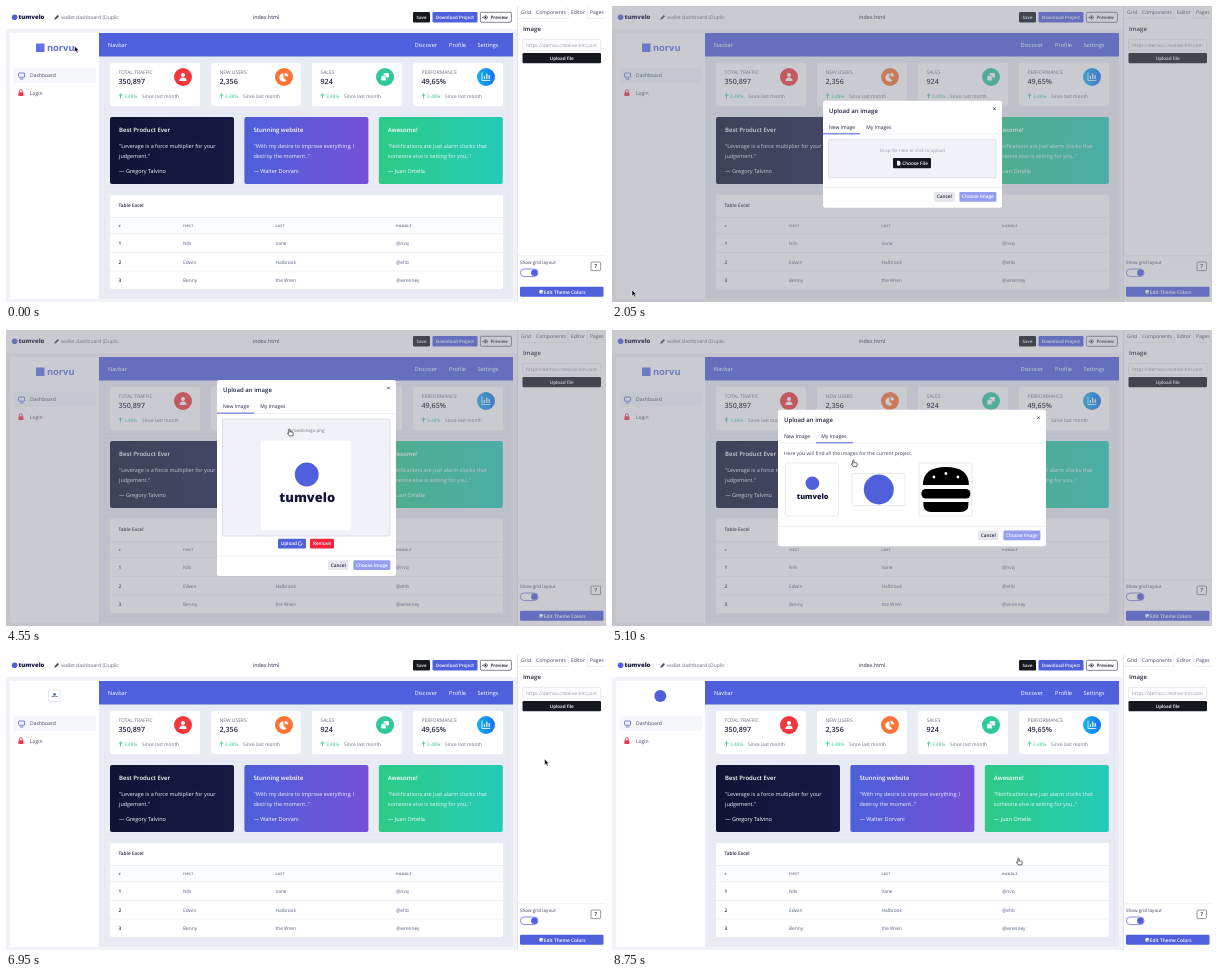
Animation of 600 by 296 pixels, one loop 8800 ms. Source, as an HTML page:

```html
<!DOCTYPE html>
<html lang="en">
<head>
<meta charset="utf-8">
<title>Image upload walkthrough</title>
<style>
html, body { margin: 0; height: 100%; overflow: hidden; background: #fff; }
svg { display: block; width: 100vw; height: 100vh; }
text { font-family: "Open Sans", "Noto Sans", sans-serif; text-rendering: geometricPrecision; }
</style>
</head>
<body>
<svg viewBox="0 0 600 296">
  <defs>
    <linearGradient id="navy"><stop stop-color="#0f1433"/><stop offset="1" stop-color="#171a45"/></linearGradient>
    <linearGradient id="violet"><stop stop-color="#4d60d9"/><stop offset="1" stop-color="#7550d6"/></linearGradient>
    <linearGradient id="mint"><stop stop-color="#2dcb85"/><stop offset="1" stop-color="#25cbb8"/></linearGradient>
    <linearGradient id="sky"><stop stop-color="#12b4ee"/><stop offset="1" stop-color="#1671ef"/></linearGradient>
  </defs>
  <g id="page"></g>
  <g id="brand"></g>
  <g id="layer">
    <rect width="600" height="296" fill="#80848f" opacity=".42"/>
    <g id="modal"></g>
  </g>
  <g id="drag"></g>
  <g id="cursor"></g>
</svg>
<script>
const $ = id => document.getElementById(id);
const BLUE = '#5060dd', PALE = '#959df0', INK = '#1f2440', BODY = '#525f7f', LINE = '#e4e7ee', BLACK = '#15181f';
const PRODUCT = 'tumvelo', THEME = 'norvu';

const rect = (x, y, w, h, fill, r = 0, extra = '') =>
  `<rect x="${x}" y="${y}" width="${w}" height="${h}" fill="${fill}" rx="${r}" ${extra}/>`;
const box = (x, y, w, h, fill, r, stroke, sw = .6) =>
  rect(x, y, w, h, fill, r, `stroke="${stroke}" stroke-width="${sw}"`);
const disc = (x, y, r, fill) => `<circle cx="${x}" cy="${y}" r="${r}" fill="${fill}"/>`;
const path = (d, fill, extra = '') => `<path d="${d}" fill="${fill}" ${extra}/>`;
const stroke = (d, color, w = .8, extra = '') =>
  path(d, 'none', `stroke="${color}" stroke-width="${w}" stroke-linecap="round" stroke-linejoin="round" ${extra}`);
const hline = (x, y, w, color = LINE) => rect(x, y, w, .6, color);
// y is the middle of the capitals
const text = (x, y, s, size = 5, fill = INK, weight = 400, extra = '') =>
  `<text x="${x}" y="${y + size * .357}" font-size="${size}" fill="${fill}" font-weight="${weight}" ${extra}>${s}</text>`;
const mid = (x, y, s, size, fill, weight) => text(x, y, s, size, fill, weight, 'text-anchor="middle"');
const button = (x, y, w, h, fill, label, size = 4.6, color = '#fff', dx = 0) =>
  rect(x, y, w, h, fill, 1.3) + mid(x + w / 2 + dx, y + h / 2, label, size, color, 600);

// Square picture with the product logo, drawn on a 90 px base
const logoCard = (x, y, size) => `<g transform="translate(${x} ${y}) scale(${size / 90})">` +
  rect(0, 0, 90, 90, '#fff') + disc(46, 34, 12, BLUE) + mid(46.5, 57, PRODUCT, 13, '#14163a', 800) + '</g>';

function topBar() {
  return rect(0, 0, 600, 296, '#f2f3f8') + rect(0, 0, 600, 23, '#fff') +
    disc(8.6, 11.3, 2.8, BLUE) + text(12.5, 11, PRODUCT, 6, '#14163a', 800) +
    path('M48.3 13.7l.5-1.8 2.9-2.9 1.3 1.3-2.9 2.9z', '#3f4658') +
    text(55, 11.3, 'wallet dashboard (Duplic', 5, '#626978') +
    text(247, 11.3, 'index.html', 5.3, INK, 500) +
    button(407, 6, 17, 10.5, BLACK, 'Save', 4.4) +
    button(426.5, 6, 45, 10.5, BLUE, 'Download Project', 4.5) +
    box(474.4, 6.3, 31, 10, '#fff', 1.3, '#30343f') +
    stroke('M477 11.4q2.5-3.4 5 0q-2.5 3.4-5 0z', BLACK, .6) + disc(479.5, 11.4, .9, BLACK) +
    text(484.5, 11.3, 'Preview', 4.6, BLACK, 600);
}

function sidebar() {
  return rect(4, 27, 89, 266, '#fff') +
    rect(7.5, 62, 82.5, 15, '#f5f7fb', 1.5) +
    box(12.6, 67, 6, 4.2, 'none', .5, BLUE, .8) + stroke('M14.2 73h2.8', BLUE) + text(24, 69.6, 'Dashboard', 5, '#3c4560') +
    rect(12.4, 86.2, 5, 3.8, '#f0344a', .6) + stroke('M13.5 86v-1a1.4 1.4 0 0 1 2.8 0v1', '#f0344a') +
    text(24, 87, 'Login', 5, '#3c4560');
}

function statCard(i, title, value, fill, icon) {
  const x = 104 + 101 * i;
  return rect(x, 57, 90, 43, '#fff', 2) + text(x + 8.5, 66, title, 4.95, '#656d80') +
    text(x + 8.5, 75.2, value, 7.2, INK, 600) +
    stroke(`M${x + 10.5} 92v-4m-1.8 1.8l1.8-1.8 1.8 1.8`, '#2dc77f') +
    text(x + 14, 90, '3.48%', 4.75, '#2dc77f') + text(x + 32, 90, 'Since last month', 4.8, '#656d80') +
    disc(x + 73, 71, 9, fill) + `<g transform="translate(${x + 73} 71)">${icon}</g>`;
}

function quote(i, fill, title, lines, author) {
  const x = 104 + 134.4 * i;
  return rect(x, 111, 124, 67, fill, 2) + text(x + 9, 124.2, title, 6, '#fff', 600) +
    lines.map((s, n) => text(x + 9, 140.3 + 9.7 * n, s, 5.45, '#f0f2ff')).join('') +
    text(x + 9, 165.2, '— ' + author, 5.5, '#fff');
}

function table() {
  const cols = [112.5, 177, 269.5, 390];
  const rows = [['1', 'Nils', 'Vane', '@nvq'], ['2', 'Edwin', 'Halbrook', '@ehb'], ['3', 'Benny', 'the Wren', '@wrenney']];
  return rect(104, 189, 393, 94, '#fff', 2) + text(112.5, 199, 'Table Excel', 4.8, INK, 600) +
    rect(104, 211, 393, 17, '#fbfcfe') + [211, 227.6, 246, 264.7].map(y => hline(104, y, 393)).join('') +
    ['#', 'FIRST', 'LAST', 'HANDLE'].map((s, c) => text(cols[c], 219.6, s, 3.3, '#4d566e', 600, 'letter-spacing=".4"')).join('') +
    rows.map((row, r) => row.map((s, c) => text(cols[c], 237.2 + 18.6 * r, s, 4.8, c ? BODY : INK, c ? 400 : 600)).join('')).join('');
}

function mainArea() {
  const white = '#fff';
  const icons = [
    disc(0, -2, 2, white) + path('M-3.6 4q0-3.6 3.6-3.6t3.6 3.6z', white),
    path('M-.6.6v-4.3a4.2 4.2 0 1 0 3 7.2z', white) + path('M.6-.7v-3.6a3.8 3.8 0 0 1 3.6 3.6z', white),
    rect(-1.3, -4, 5.2, 4.6, white, .8) + box(-4, -1.4, 5.2, 5.2, white, .8, '#2dc99a', .6),
    stroke('M-4-4v7.5h8', white) + stroke('M-1.6 1.5v-2M.8 1.5v-4.5M3.2 1.5v-3', white, 1.2)
  ];
  return rect(93, 27, 414, 266, '#e9ecf5') +
    [[54, 50], [108, 73], [186, 100]].map(([y, h]) => box(98.5, y, 404, h, 'none', 0, '#dde1ee', .5)).join('') +
    rect(93, 27, 414, 23.5, BLUE) +
    text(102, 38.6, 'Navbar', 5.6, white) + text(408.5, 38.6, 'Discover', 5.7, white) +
    text(443, 38.6, 'Profile', 5.7, white) + text(471.5, 38.6, 'Settings', 5.7, white) +
    statCard(0, 'TOTAL TRAFFIC', '350,897', '#f2383c', icons[0]) +
    statCard(1, 'NEW USERS', '2,356', '#fb7436', icons[1]) +
    statCard(2, 'SALES', '924', '#2dc99a', icons[2]) +
    statCard(3, 'PERFORMANCE', '49,65%', 'url(#sky)', icons[3]) +
    quote(0, 'url(#navy)', 'Best Product Ever', ['"Leverage is a force multiplier for your', 'judgement."'], 'Gregory Talvino') +
    quote(1, 'url(#violet)', 'Stunning website', ['"With my desire to improve everything, I', 'destroy the moment.."'], 'Walter Dorvani') +
    quote(2, 'url(#mint)', 'Awesome!', ['"Notifications are just alarm clocks that', 'someone else is setting for you,."'], 'Juan Ortella') +
    table();
}

function panel() {
  const tabs = { Grid: 515, Components: 530, Editor: 565, Pages: 584 };
  return rect(511.5, 0, 88.5, 296, '#fff') + rect(511.3, 0, .7, 296, '#d9dce4') +
    stroke('M512 12.6h50v-12.6M581.5 0v12.6h18.5', '#dfe2e9', .6) +
    Object.entries(tabs).map(([s, x]) => text(x, 6.2, s, 5, '#3c4560')).join('') +
    text(517, 22.6, 'Image', 6, INK, 600) +
    box(516.8, 33.3, 78, 11.5, '#fff', 1.3, '#d3d7e0') + text(520, 39, 'https://demos.creative-tim.com', 4.85, '#8f96a5') +
    button(516.5, 47, 78.5, 10.3, BLACK, 'Upload file') +
    hline(512, 249.5, 88) + text(514, 256.3, 'Show grid layout', 4.6, '#3c4560') +
    box(514.4, 263, 17.6, 7.6, '#fff', 3.8, BLUE, .7) + disc(528.3, 266.8, 3.2, BLUE) +
    box(585, 256, 9.6, 8.6, '#fff', 1, '#4a4f5c') + mid(589.8, 260.3, '?', 5.5, BLACK, 600) +
    button(514, 280.8, 83.5, 10, BLUE, 'Edit Theme Colors', 4.8, '#fff', 3) +
    disc(535.2, 285.8, 2, '#fff') + disc(536, 286.6, .7, BLUE);
}

function brand(state) {
  if (state === 0) return rect(30, 37.5, 8.5, 8.5, '#5e72e4') + text(41, 41.8, THEME, 9.3, '#5e72e4', 700);
  if (state === 1) return box(42.8, 36, 11.2, 11.2, '#fff', 0, '#c9cdec', .6) + logoCard(43.4, 36.6, 10);
  return disc(48.3, 42, 6, BLUE);
}

// Title, tabs and footer shared by both dialogs
function dialog(x, y, w, h, tab, ready) {
  const right = x + w, end = y + h, tabX = x + (tab ? 38 : 0);
  return rect(x, y, w, h, '#fff', 2.5) + text(x + 6, y + 10, 'Upload an image', 6, INK, 600) +
    stroke(`M${right - 8.5} ${y + 7}l2 2m0-2l-2 2`, INK, .7) +
    text(x + 6, y + 26.6, 'New Image', 5) + text(x + 43.3, y + 26.6, 'My Images', 5) +
    hline(x, y + 33, w) + rect(tabX, y + 32.6, 37, 1, BLUE) +
    hline(x, end - 20.3, w) +
    button(right - 68, end - 15.8, 20.5, 9.8, '#e6e7ec', 'Cancel', 4.7, INK) +
    button(right - 42.6, end - 15.8, 37, 9.8, ready ? BLUE : PALE, 'Choose Image', 4.7);
}

const burger = path('M4 22q0-18 23-18t23 18z', '#000') + [[15, 14], [27, 10.5], [39, 14]].map(([x, y]) => disc(x, y, 1.4, '#fff')).join('') +
  rect(2.5, 26, 49, 9.5, '#000', 4.5) + path('M4.5 39h45v3q0 7-8 7h-29q-8 0-8-7z', '#000');

function gallery(count, picked) {
  const cards = [logoCard(1, 1, 51), disc(26.7, 26.5, 15, BLUE), burger].slice(3 - count);
  const wide = count - 2;
  return dialog(166, 79.7, 268, 136.5, 1, picked >= 0) +
    text(172, 122.8, 'Here you will find all the images for the current project.', 5, '#3c4560') +
    cards.map((art, i) => `<g transform="translate(${173.3 + 66.8 * i} 133)">` +
      (i === wide ? box(0, 10.5, 53, 32, '#fff', 1, '#d5d8e0') : box(0, 0, 53, 53, '#fff', 1.5, '#d5d8e0')) + art +
      (i === picked ? (i === wide ? box(0, 10.5, 53, 32, 'none', 1, BLUE, 1.5) : box(0, 0, 53, 53, 'none', 1.5, BLUE, 1.5)) : '') + '</g>').join('');
}

function uploader(loaded) {
  const y = loaded ? 50 : 94.7, h = loaded ? 196 : 107;
  const out = dialog(211, y, 179, h, 0, false) + box(216.5, y + 39, 167.5, loaded ? 117 : 38, '#f0f2f8', 1, '#c9cede');
  if (!loaded) return out + mid(300.5, 144.8, 'Drop file here or click to upload', 4.45, '#979dac') +
    button(281, 152, 38, 10.3, BLACK, 'Choose File', 4.7, '#fff', 3) + path('M285 154.8h2.2l1.2 1.2v3.6h-3.4z', '#fff');
  return out + mid(300, 100, PRODUCT + '-logo.png', 4.5, '#6f7686') + logoCard(255, 110.7, 89.5) +
    button(272, 208.8, 28, 9.7, BLUE, 'Upload', 4.7, '#fff', -3.2) +
    '<g id="spin">' + stroke('M296.1 213.6a1.9 1.9 0 1 1-1.2-1.8', '#fff', .7) + '</g>' +
    button(304, 208.8, 24, 9.7, '#f0263f', 'Remove', 4.7);
}

const arrow = path('M0 0v6l1.5-1.2 1 2.2 1.1-.5-1-2.1h1.9z', '#000', 'stroke="#fff" stroke-width=".5"');
const hand = path('M-.6.5q.6-.9 1.2 0v2.2l2.6.6q.7.2.6 1l-.5 2.6h-3.4l-2-2.6q.2-.9 1.5 0z', '#fff', 'stroke="#000" stroke-width=".6"');

// time, x, y, pointer shape reached at that moment
const route = [
  [0, 68.5, 40, 0], [150, 68.5, 40, 0], [600, 556, 51, 1], [950, 556, 51, 1], [1130, 194.5, 107.5, 1],
  [1300, 194.5, 107.5, 0], [1800, 20, 284, 0], [2350, 20, 284, 0], [3050, 222, 190, 0], [3150, 226, 189, 0],
  [3420, 290, 156, 0], [3650, 290, 156, 1], [4050, 284, 213, 1], [4200, 284, 213, 1], [4500, 283.5, 99, 1],
  [4900, 283.5, 99, 1], [5300, 200, 160, 1], [5450, 200, 160, 1], [5850, 406.5, 205, 1], [6450, 406.5, 205, 0],
  [6950, 538.5, 105, 0], [7080, 556, 51, 1], [7350, 556, 51, 1], [7700, 267, 160, 1], [7820, 267, 160, 1],
  [8100, 406.5, 204, 1], [8800, 406.5, 204, 1]
];
const ramp = (t, a, b) => Math.min(1, Math.max(0, (t - a) / (b - a)));

function pointer(t) {
  const i = Math.max(1, route.findIndex(p => p[0] > t));
  const [a, b] = [route[i - 1], route[i]];
  const k = ramp(t, a[0], b[0]), e = k * k * (3 - 2 * k);
  return { x: a[1] + (b[1] - a[1]) * e, y: a[2] + (b[2] - a[2]) * e, shape: a[3] };
}

const views = [
  [1250, () => gallery(2, -1)], [3450, () => uploader(false)], [4900, () => uploader(true)],
  [5400, () => gallery(3, -1)], [7000, () => gallery(3, 0)], [7800, () => gallery(3, -1)], [8800, () => gallery(3, 1)]
];
let shownView, shownBrand;

function draw(t) {
  const view = views.find(v => t < v[0]);
  if (view !== shownView) $('modal').innerHTML = (shownView = view)[1]();
  const stage = t < 6150 ? 0 : t < 8350 ? 1 : 2;
  if (stage !== shownBrand) $('brand').innerHTML = brand(shownBrand = stage);
  $('layer').setAttribute('opacity', ramp(t, 700, 850) - ramp(t, 6050, 6250) + ramp(t, 7200, 7350) - ramp(t, 8250, 8450));
  const turn = ramp(t, 4200, 4900) * 720;
  $('spin')?.setAttribute('transform', `rotate(${turn} 294.4 213.6)`);
  const p = pointer(t), place = `translate(${p.x} ${p.y})`;
  for (const id of ['cursor', 'drag']) $(id).setAttribute('transform', place);
  $('cursor').innerHTML = p.shape ? hand : arrow;
  $('drag').setAttribute('display', t > 2350 && t < 3450 ? 'inline' : 'none');
}

$('page').innerHTML = topBar() + sidebar() + mainArea() + panel();
$('drag').innerHTML = box(-25, -29.5, 21, 21, '#fff', 1, '#c3c6cf', .5) + logoCard(-24, -28.5, 19) +
  rect(-34, -5.6, 39.5, 6.6, '#1c5fd6', 1) + mid(-14.2, -2.3, PRODUCT + '-logo.png', 4.2, '#fff', 500) +
  disc(2.3, 6.3, 3.7, '#23a455') + stroke('M.5 6.3h3.6m-1.8-1.8v3.6', '#fff', .9);

const start = performance.now();
(function frame() {
  draw((performance.now() - start) % 8800);
  requestAnimationFrame(frame);
})();
</script>
</body>
</html>
```
